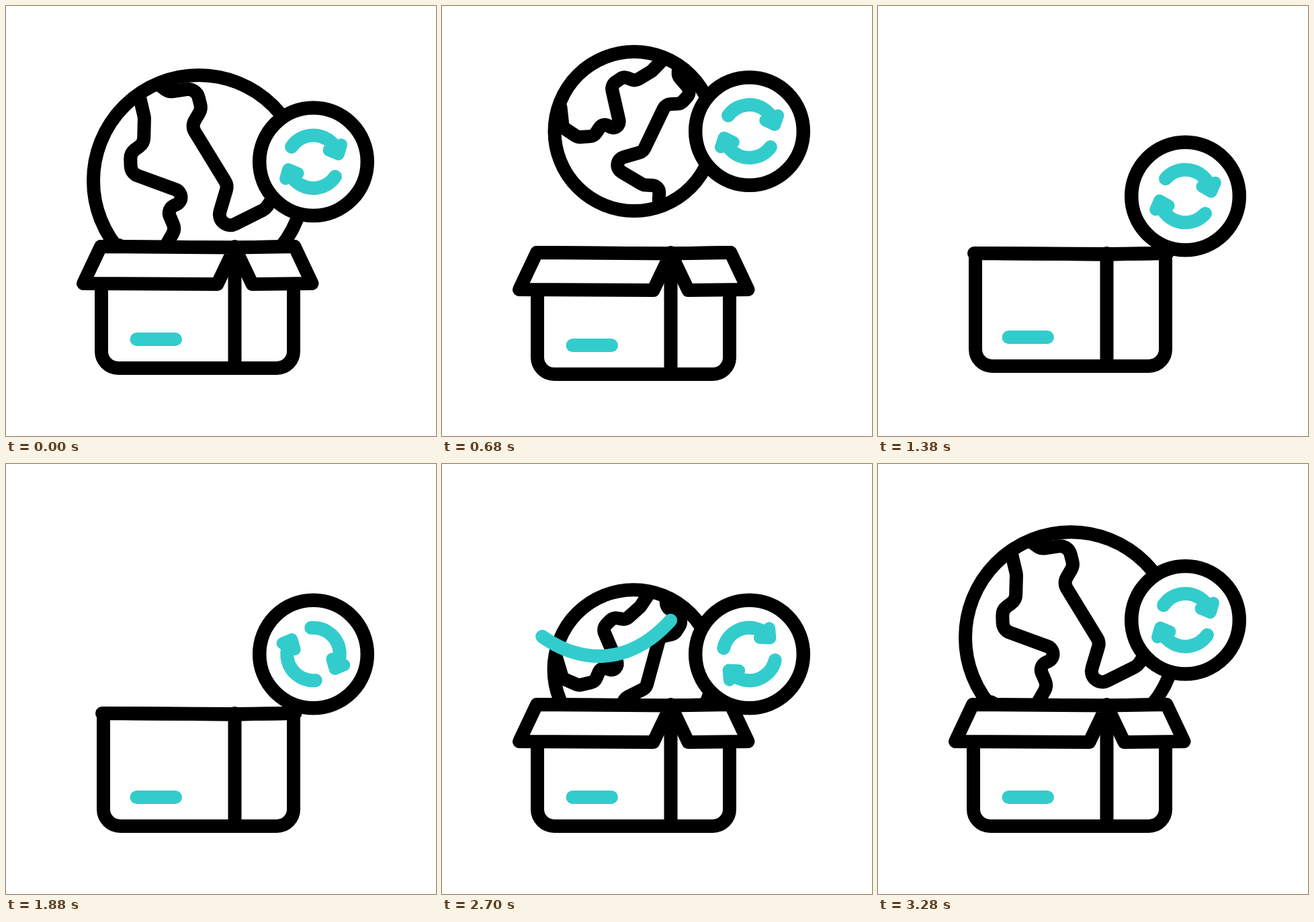
An HTML page with a canvas for the animation above (3.32 s loop, 640 px wide and 640 px high).

```html
<!DOCTYPE html>
<html lang="en">
<head>
<meta charset="utf-8">
<title>Reusable packaging</title>
<style>
html, body { margin: 0; width: 100%; height: 100%; overflow: hidden; background: #fff; }
canvas { display: block; width: 640px; height: 640px; }
</style>
</head>
<body>
<canvas id="stage" width="640" height="640"></canvas>
<script>
const ctx = document.getElementById('stage').getContext('2d');
const LOOP = 3320, STROKE = 20, BLACK = '#000', TEAL = '#33cccc', WHITE = '#fff';

const span = (t, a, b) => Math.max(0, Math.min(1, (t - a) / (b - a)));
const ease = (t, a, b) => { const u = span(t, a, b); return u * u * (3 - 2 * u); };
const mix = (a, b, p) => a.map((v, i) => v + (b[i] - v) * p);
const gap = (a, b) => Math.hypot(b[0] - a[0], b[1] - a[1]);

function paint(color, width, fill) {
  if (fill) { ctx.fillStyle = fill; ctx.fill(); }
  ctx.strokeStyle = color;
  ctx.lineWidth = width;
  ctx.stroke();
}

function poly(points, closed) {
  ctx.beginPath();
  points.forEach(([x, y]) => ctx.lineTo(x, y));
  if (closed) ctx.closePath();
}

// Polyline whose corners are rounded as far as their neighbours allow
function roundedLine(points, maxRadius) {
  ctx.beginPath();
  ctx.moveTo(...points[0]);
  for (let i = 1; i < points.length - 1; i++) {
    const [a, b, c] = points.slice(i - 1, i + 2);
    const turn = Math.atan2(c[1] - b[1], c[0] - b[0]) - Math.atan2(b[1] - a[1], b[0] - a[0]);
    const room = Math.min(gap(a, b), gap(b, c)) / 2;
    ctx.arcTo(...b, ...c, Math.min(maxRadius, room / Math.abs(Math.tan(turn / 2))));
  }
  ctx.lineTo(...points[points.length - 1]);
}

// Coastline corners, relative to the globe centre
const WEST = [[-88, -124], [-81, -94], [-82, -56], [-102, -41], [-101, -11], [-27, 16],
  [-26, 32], [-48, 42], [-35, 72], [-51, 100], [-83, 114], [-119, 96]];
const EAST = [[-61, -144], [-45, -132], [-4, -138], [4, -107], [-11, -81], [43, 7],
  [21, 81], [99, 42], [117, 16], [141, 33]];

function globePose(t) {
  if (t < LOOP / 2) {
    const lift = ease(t, 200, 733), fall = span(t, 733, 1160) ** 2;
    return {
      x: 287 - lift + 14 * fall,
      y: 260 - 75.5 * lift + 271 * fall,
      scale: 1 - 0.252 * lift - 0.143 * fall,
      turn: 2 * Math.PI * ease(t, 200, 2107)
    };
  }
  const rise = ease(t, 2300, 3050);
  return {
    x: 283 + 4 * rise,
    y: 425 - 216 * rise + 51 * ease(t, 3050, 3310),
    scale: 0.455 + 0.545 * rise,
    turn: 1.82 * (1 - rise)
  };
}

function drawGlobe({ x, y, scale, turn }) {
  ctx.save();
  ctx.translate(x, y);
  ctx.beginPath();
  ctx.arc(0, 0, 157 * scale, 0, 7);
  paint(BLACK, STROKE, WHITE);
  ctx.rotate(turn);
  for (const coast of [WEST, EAST]) {
    roundedLine(coast.map(([px, py]) => [px * scale, py * scale]), 16 * scale);
    paint(BLACK, STROKE);
  }
  ctx.restore();
}

// Point on a Bezier curve of any degree
function bezier(points, u) {
  while (points.length > 1) points = points.slice(1).map((q, k) => mix(points[k], q, u));
  return points[0];
}

// Spin streak beside the globe: grows along its curve, then is wiped away
function drawStreak(curve, t, begin, pose) {
  const head = ease(t, begin, begin + 180), tail = ease(t, begin + 220, begin + 400);
  if (head - tail < 0.002) return;
  const points = Array.from({ length: 41 }, (_, i) => {
    const [x, y] = bezier(curve, tail + (head - tail) * i / 40);
    return [pose.x + x, pose.y + y];
  });
  poly(points);
  paint(TEAL, STROKE);
}

// Lid poses from open to shut: [flap drop, flap spread, hinge height, wall x]
const LID = [[55, 26, 358, 142], [8, 23, 358, 146.5], [-38, 21, 366, 145], [0, 1, 371, 145]];

function lidPose(t) {
  const fold = ease(t, 790, 965) + ease(t, 965, 1065) + ease(t, 1140, 1250)
    - ease(t, 2200, 2300) - 2 * ease(t, 2300, 2375);
  const i = Math.max(0, Math.min(2, Math.floor(fold)));
  return mix(LID[i], LID[i + 1], fold - i);
}

function drawBox(t) {
  const [drop, spread, lid, left] = lidPose(t);
  const right = 428, middle = 340.5, floor = 539;
  const sink = 19 * (ease(t, 600, 767) - ease(t, 767, 967));
  const hop = 3 * (ease(t, 1250, 1350) - ease(t, 1400, 1500));
  ctx.save();
  ctx.translate(0, sink - hop);

  ctx.beginPath();
  ctx.moveTo(left, lid);
  ctx.arcTo(left, floor, middle, floor, 25);
  ctx.arcTo(right, floor, right, lid, 25);
  ctx.lineTo(right, lid);
  ctx.lineTo(middle, lid + 1.5);
  ctx.closePath();
  paint(BLACK, STROKE, WHITE);
  poly([[middle, lid], [middle, floor]]);
  paint(BLACK, STROKE);

  for (const [hinge, side] of [[left - 1, -1], [right + 1.5, 1]]) {
    poly([
      [middle, lid + 1.5],
      [hinge, lid],
      [hinge + side * spread, lid + drop],
      [middle + side * spread, lid + drop + 1]
    ], true);
    paint(BLACK, STROKE, WHITE);
  }

  poly([[194.5, 496], [252, 496]]);
  paint(TEAL, STROKE);
  ctx.restore();
}

function drawBadge(t) {
  const y = 231.8 - 46.6 * ease(t, 200, 733) + 97.8 * ease(t, 733, 1092) - 51.2 * ease(t, 2733, 3315);
  ctx.save();
  ctx.translate(457.5, y);
  ctx.beginPath();
  ctx.arc(0, 0, 80.3, 0, 7);
  paint(BLACK, 20.5, WHITE);
  ctx.rotate(4 * Math.PI * ease(t, 600, 2940));
  for (let i = 0; i < 2; i++) {
    ctx.beginPath();
    ctx.arc(0, 0, 39.3, 3.74, 5.67);
    paint(TEAL, STROKE);
    poly([[41.5, -25.5], [23, -17.2], [37.3, -11.2]], true);
    paint(TEAL, 18, TEAL);
    ctx.rotate(Math.PI);
  }
  ctx.restore();
}

function draw(t) {
  ctx.fillStyle = WHITE;
  ctx.fillRect(0, 0, 640, 640);
  ctx.lineCap = ctx.lineJoin = 'round';
  if (t < 1160 || t > 2310) {
    const pose = globePose(t);
    drawGlobe(pose);
    drawStreak([[-121, 29], [-30, 29], [57, -6], [56, -99]], t, 760, pose);
    drawStreak([[-136, -49], [-80, -9], [-7, -4], [55, -73]], t, 2500, pose);
  }
  drawBox(t);
  drawBadge(t);
}

const start = performance.now();
function tick() {
  draw((performance.now() - start) % LOOP);
  requestAnimationFrame(tick);
}
tick();
</script>
</body>
</html>
```
